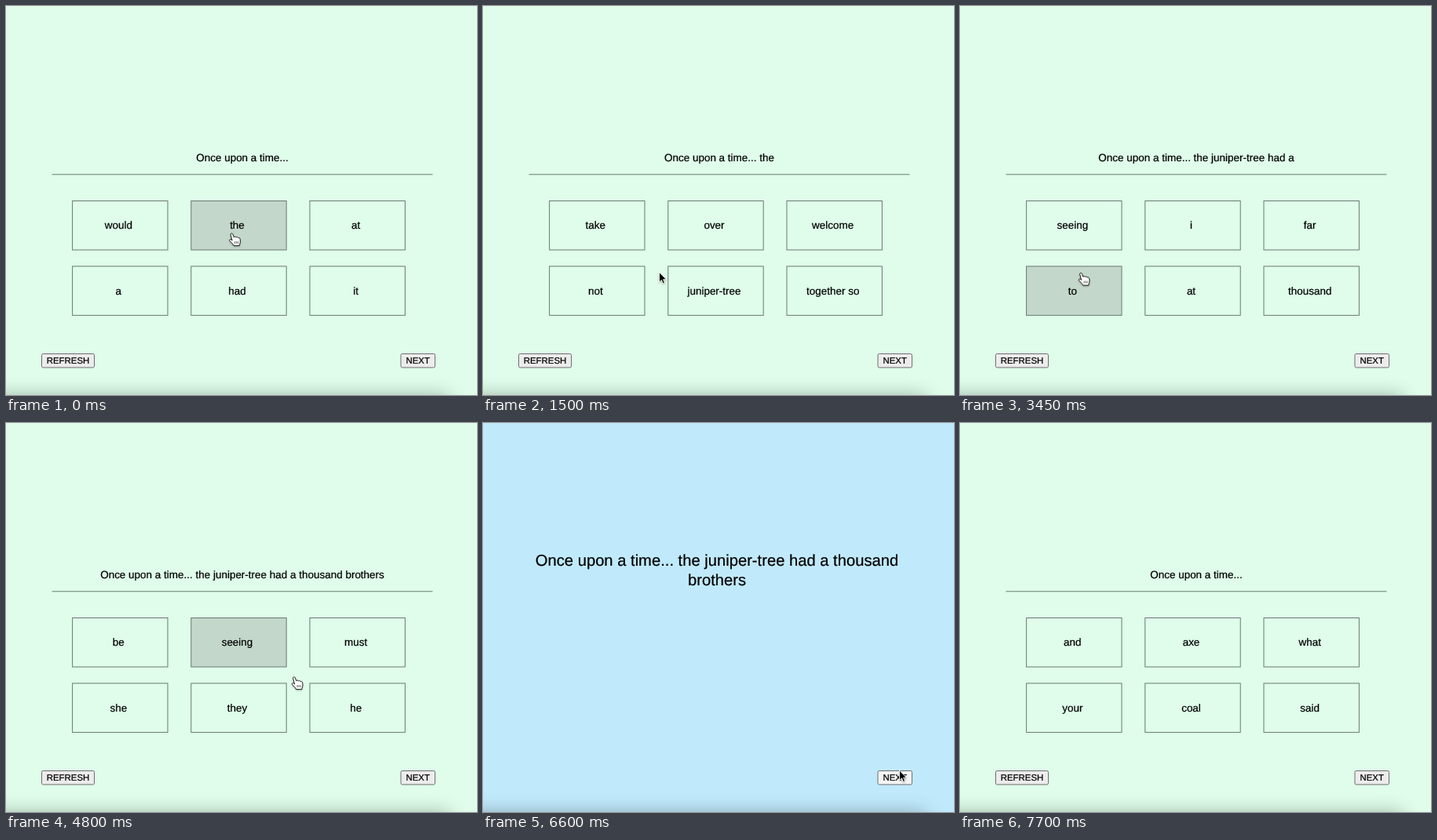
Write an HTML page that moves like this. It is 600 px wide and 496 px high and loops after 8000 ms.

```html
<!DOCTYPE html>
<html lang="en">
<head>
<meta charset="utf-8">
<title>Story builder</title>
<style>
  html, body { margin: 0; width: 100%; height: 100%; overflow: hidden; }
  #stage { position: relative; width: 600px; height: 496px; overflow: hidden; background: #dffdea; }
  #stage.story { background: #c0eafc; }
  svg { position: absolute; left: 0; top: 0; }
  text { font-family: "Liberation Sans", Arial, sans-serif; text-anchor: middle;
         text-rendering: geometricPrecision; stroke: #000; stroke-width: .22px; }
  .word { font-size: 13.47px; }
  .big { font-size: 20.2px; }
  .label { font-size: 11.4px; }
  .card { fill: none; stroke: #6a7972; }
  .card.hot { fill: #c3d8cb; }
  .button { fill: #ececec; stroke: #6d6d6d; }
  .button.hot { fill: #e0e0e0; }
  .button.down { fill: #f5f5f5; }
  #cursor { filter: drop-shadow(0 1px 1px rgba(0, 0, 0, .3)); }
  #dock { position: absolute; left: -40px; top: 497px; width: 606px; height: 60px;
          border-radius: 12px; box-shadow: 0 0 24px rgba(0, 0, 0, .3); }
</style>
</head>
<body>
<div id="stage">
  <div id="dock"></div>
  <svg width="600" height="496" viewBox="0 0 600 496">
    <g id="picker">
      <text id="sentence" class="word" x="301" y="198.3"></text>
      <path d="M58.5 214.8H543.5" stroke="#6a7972"/>
      <g id="cards"></g>
    </g>
    <g id="tale">
      <text class="big" x="298" y="181.7">Once upon a time... the juniper-tree had a thousand</text>
      <text class="big" x="298" y="207.2">brothers</text>
    </g>
    <g id="buttons"></g>
    <g id="cursor">
      <path id="arrow" d="M0 0V12.6L2.9 9.9L4.9 14.5L7 13.6L5.1 9.2H9Z" stroke="#fff" stroke-width=".9"/>
      <g id="hand" fill="#fff" stroke="#000" stroke-width=".85" stroke-linejoin="round">
        <path d="M-2.8 1.5C-3.2-.2-.8-.9-.2.8L1.3 4.8C2 3.8 3.6 4 4 5C4.8 4.2 6.2 4.6 6.6 5.6C7.6 5 9 5.8 9.2 7.2C9.6 10 9.6 12 8.4 14.4V15.6H1.2C.2 13.4-2 11.6-4 9.4C-4.9 8.2-3.4 7-2.2 7.8L-.9 9Z"/>
        <path d="M2.6 10V13M4.6 10V13M6.6 10V13" stroke-width=".6"/>
      </g>
    </g>
  </svg>
</div>
<script>
const LOOP = 8000, STEP = 50;
const $ = id => document.getElementById(id);
const REFRESH = [68, 443];

const story = "the juniper-tree had a thousand brothers".split(" ");
const pool = ("one little was go king of door my come then up wife will her out " +
  "so bird and you his no on what did him who").split(" ");

// time, words chosen so far, offer (shuffled from the pool when left out)
const scenes = [
  [0, 0, "would|the|at|a|had|it"],
  [50, 1], [950, 1],
  [1050, 1, "take|over|welcome|not|juniper-tree|together so"],
  [1750, 2], [1900, 3], [2300, 3], [2500, 3], [2600, 3],
  [3150, 4, "seeing|i|far|to|at|thousand"],
  [3750, 5], [4200, 5], [4300, 5],
  [4700, 6, "be|seeing|must|she|they|he"],
  [5250, 6, ""],
  [6650, 0, "and|axe|what|your|coal|said"]
].map(([time, count, offer]) => ({ time, count, offer }));

// where the pointer rests: arrival, departure, place
const stops = [
  [0, 50, [289, 290]],
  [400, 400, [498, 335]],
  [850, 1100, REFRESH],
  [1500, 1500, [224.5, 339.5]],
  [1700, 1900, [284, 344]],
  [2250, 2850, REFRESH],
  [3100, 3450, [155.5, 340.5]],
  [3700, 3800, [436, 352]],
  [4050, 4300, REFRESH],
  [4600, 4700, [300, 285]],
  [4800, 4800, [368.5, 324]],
  [5100, 5550, [514.5, 446.5]],
  [6600, 6800, [530.5, 443]],
  [7000, 7000, [300, 112]],
  [7150, 7500, REFRESH],
  [7700, LOOP, [534, -25]]
];

function add(parent, tag, attrs, text = "") {
  const el = document.createElementNS("http://www.w3.org/2000/svg", tag);
  for (const k in attrs) el.setAttribute(k, attrs[k]);
  el.textContent = text;
  return parent.appendChild(el);
}

const cards = [...Array(6).keys()].map(i => {
  const col = i % 3, row = Math.floor(i / 3);
  const x = 84.6 + 151.2 * col, y = 248.5 + 83.4 * row, w = 121.4, h = 62.5;
  return {
    x, y, w, h,
    box: add($("cards"), "rect", { x, y, width: w, height: h, class: "card" }),
    text: add($("cards"), "text", { x: x + 58.7, y: 284.4 + 84 * row, class: "word" })
  };
});

const buttons = [["REFRESH", 45.5, 67], ["NEXT", 503, 43.5]].map(([name, x, w]) => {
  const y = 443.5, h = 17.5, g = add($("buttons"), "g", {});
  const box = add(g, "rect", { x, y, width: w, height: h, rx: 1.8, class: "button" });
  add(g, "text", { x: x + w / 2, y: 456.1, class: "label" }, name);
  return { x, y, w, h, g, box };
});

const inside = ([x, y], r) =>
  x >= r.x && x <= r.x + r.w && y >= r.y - 1 && y <= r.y + r.h;

function pointer(t) {
  const i = stops.findIndex(s => t <= s[1]);
  const [arrive, , to] = stops[i];
  if (t >= arrive) return to;
  const [, leave, from] = stops[i - 1];
  const s = (t - leave) / (arrive - leave), e = s * s * (3 - 2 * s);
  return from.map((v, k) => v + (to[k] - v) * e);
}

let seed = 7;
const random = () => (seed = seed * 16807 % 2147483647) / 2147483647;

// fill the open offers; a word about to be picked lies under the pointer
scenes.forEach((s, i) => {
  if (s.offer === undefined) {
    const rest = [...pool];
    s.words = cards.map(() => rest.splice(Math.floor(random() * rest.length), 1)[0]);
    const next = scenes[i + 1];
    if (next.count > s.count) {
      const at = pointer(next.time);
      s.words[cards.findIndex(c => inside(at, c))] = story[s.count];
    }
  } else s.words = s.offer ? s.offer.split("|") : [];
});

const show = (el, on) => { el.style.display = on ? "" : "none"; };

function draw(t) {
  const { count, words } = scenes.filter(s => s.time <= t).pop();
  const picking = words.length > 0;
  const pos = pointer(t), felt = pointer(Math.max(0, t - STEP)); // hover lags one step
  const clicking = scenes.some(s => s.time > t && s.time - t <= STEP);

  $("stage").classList.toggle("story", !picking);
  show($("picker"), picking);
  show($("tale"), !picking);
  show(buttons[0].g, picking);
  $("sentence").textContent = ["Once upon a time...", ...story.slice(0, count)].join(" ");

  cards.forEach((c, i) => {
    c.text.textContent = words[i] || "";
    c.box.classList.toggle("hot", inside(felt, c));
  });
  for (const b of buttons) {
    const hot = inside(felt, b);
    b.box.classList.toggle("hot", hot);
    b.box.classList.toggle("down", hot && clicking);
  }
  const onCard = picking && cards.some(c => inside(felt, c));
  show($("hand"), onCard);
  show($("arrow"), !onCard);
  $("cursor").setAttribute("transform", `translate(${pos.join(" ")})`);
}

const start = performance.now();
function tick() {
  const t = (performance.now() - start) % LOOP;
  draw(Math.floor(t / STEP) * STEP);
  requestAnimationFrame(tick);
}
tick();
</script>
</body>
</html>
```
